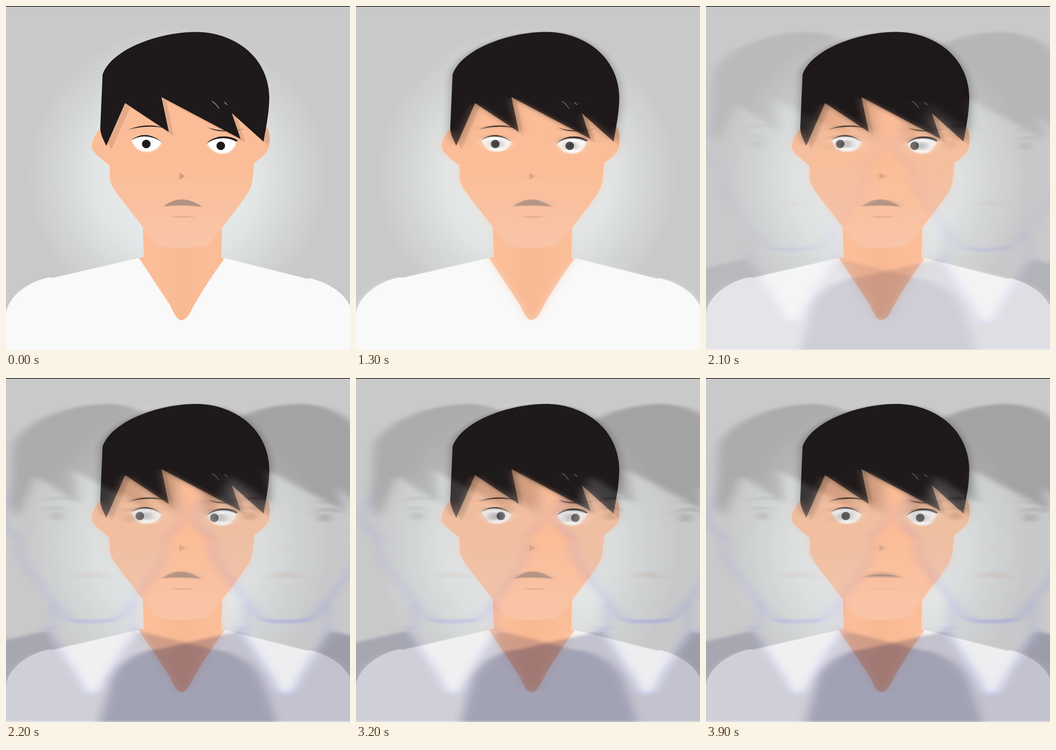
An HTML page for the animation above (4000 ms loop, 748x748 px).

```html
<!DOCTYPE html>
<html lang="en">
<head>
<meta charset="utf-8">
<title>Anxious portrait</title>
<style>
  html, body { margin: 0; width: 100%; height: 100%; overflow: hidden; }
  svg { display: block; width: 748px; height: 748px; }
  .shirt { fill: var(--shirt, #f9f9f9); }
  .neck { fill: var(--skin, url(#neckTone)); }
  .face { fill: var(--skin, url(#faceTone)); }
  .neck, .face { stroke: var(--rim, none); stroke-width: 14; paint-order: stroke; }
  .hair { fill: #1e191a; }
  .white { fill: var(--white, #fff); }
  .line { fill: none; stroke: #1e191a; }
  .eyes { transform-origin: 0 288px; transform: scaleY(var(--open, 1)); }
  .pupils { fill: #1e191a; opacity: var(--pupil, 1); transform: translateX(var(--look, 0px)); }
  .mouth { transform-origin: 0 430px; transform: translateX(var(--mouthX, 0px)) scaleY(var(--mouthY, 1)); }
  #ghosts { --shirt: #000037; --skin: #c4c8cc; --white: #c4c8cc; --rim: #4a4aff; }
</style>
</head>
<body>
<svg viewBox="0 0 748 748">
  <defs>
    <radialGradient id="glow" gradientUnits="userSpaceOnUse" cx="372" cy="370" r="328">
      <stop offset="0" stop-color="#eef2f2"/>
      <stop offset=".55" stop-color="#e2e5e5"/>
      <stop offset=".8" stop-color="#d3d5d5"/>
      <stop offset="1" stop-color="#c9c9ca"/>
    </radialGradient>
    <linearGradient id="faceTone" x2="0" y2="1">
      <stop offset=".5" stop-color="#fbbd97"/>
      <stop offset="1" stop-color="#f9c5a8"/>
    </linearGradient>
    <linearGradient id="neckTone">
      <stop offset=".2" stop-color="#fbbe99"/>
      <stop offset=".5" stop-color="#f8b993"/>
      <stop offset=".8" stop-color="#fbbd97"/>
    </linearGradient>
    <filter id="soft" x="-20%" y="-20%" width="140%" height="140%">
      <feGaussianBlur stdDeviation="1.8"/>
    </filter>
    <filter id="shake" filterUnits="userSpaceOnUse" x="-80" y="-20" width="920" height="800" color-interpolation-filters="sRGB">
      <feGaussianBlur stdDeviation="11 1"/>
    </filter>
    <filter id="smear" filterUnits="userSpaceOnUse" x="-80" y="-20" width="920" height="800" color-interpolation-filters="sRGB">
      <feGaussianBlur stdDeviation="11 2"/>
    </filter>
    <path id="facePath" d="M205 266C190 285 186 295 187 310C191 320 208 333 225 347L226 379C231 396 240 405 251 421L297 480C308 495 320 512 334 521C352 529 395 526 430 523C444 516 455 500 470 482L510 430C525 408 534 397 536 378L540 341C561 326 571 317 573 300C575 283 572 270 566 262L540 150H230Z"/>
    <path id="hairPath" d="M210 149C228 95 330 57 412 56.5C495 56 572 110 572.5 200C572 235 565 265 560 295L491 233L510 289L338 198L354 274L259 211L218 304C210 287 205 278 205 264Z"/>
    <clipPath id="onFace"><use href="#facePath"/></clipPath>

    <g id="person">
      <path class="shirt" d="M-22 748C-12 712 -6 690 0 668C5 630 50 598 95 590L102 591L289 548H475L655 593L662 592C705 603 735 625 748 652C762 685 772 715 782 748Z"/>
      <path class="neck" d="M297 470L300 546L289 548L357 651C369 678 375 683 382 683C391 682 398 673 406 656C420 630 455 575 475 550L468 547L470 470Z"/>
      <use class="face" href="#facePath"/>
      <g clip-path="url(#onFace)"><use href="#hairPath" x="11" y="9" opacity=".1"/></g>

      <g class="eyes">
        <g class="white" filter="url(#soft)">
          <path d="M273 291Q303 271 338 295C334 311 320 317 305 317C288 317 277 305 273 291Z"/>
          <path d="M437 299C450 285 480 282 502 293C497 313 484 321 470 321C454 321 443 311 437 299Z"/>
        </g>
        <path class="hair" d="M271 292Q303 267 340 296Q304 273 271 292Z"/>
        <path class="hair" d="M435 300C450 282 482 278 504 292L501 295C480 283 452 286 435 300Z"/>
      </g>
      <g class="pupils">
        <circle cx="305" cy="300" r="9.3"/>
        <circle cx="467" cy="304" r="9.3"/>
      </g>

      <path class="hair" d="M266 269Q305 253 344 265Q305 258 266 269Z"/>
      <path class="hair" d="M439 264Q460 272 490 271Q460 276 439 264Z"/>
      <path class="line" d="M488 272Q505 271 517 267" stroke-width=".7" opacity=".6"/>
      <path d="M377 362L390 370L377 378Z" fill="#d0a088"/>
      <g class="mouth">
        <path d="M342 436Q362 420 382 420.5Q405 421 427 437Q384 431 342 436Z" fill="#b39484"/>
        <path d="M358 457Q386 459 413 457Q386 463 358 457Z" fill="#cf9b80"/>
      </g>
      <use class="hair" href="#hairPath"/>
      <path d="M448 207Q458 214 463 223M475 209L481 215" fill="none" stroke="#c9c3bd" stroke-width="1.2"/>
    </g>
  </defs>

  <rect width="748" height="748" fill="url(#glow)"/>
  <use id="sharp" href="#person"/>
  <g id="halo" filter="url(#shake)"><use href="#person"/></g>
  <g id="ghosts">
    <g id="left" opacity=".165"><use href="#person" filter="url(#smear)"/></g>
    <g id="right" opacity=".21"><use href="#person" filter="url(#smear)"/></g>
  </g>
  <rect width="748" height="1.3"/>
</svg>
<script>
  const LOOP = 4000, STEP = 100;
  const [sharp, halo, ghosts, left, right] =
    ['sharp', 'halo', 'ghosts', 'left', 'right'].map(id => document.getElementById(id));

  // Linear interpolation through [time, value] keys
  function track(keys, t) {
    const i = keys.findIndex(k => k[0] >= t);
    if (i < 1) return keys[i < 0 ? keys.length - 1 : 0][1];
    const [t0, a] = keys[i - 1], [t1, b] = keys[i];
    return a + (b - a) * (t - t0) / (t1 - t0);
  }

  const LOOK = [[1200, 0], [1700, -11], [2000, -12.7], [2200, -14], [2400, -14],
                [2800, 2], [3200, 10], [3500, 10], [3900, -1.2], [4000, 0]];
  const OPEN = [[400, 1], [700, .35], [1000, 1]];
  const HALO = [[600, 0], [700, .38], [1800, .4], [2000, .43]];
  const GHOSTS = [[2000, 0], [2200, 1]];
  const MOUTH = [[3700, 1], [3900, .4], [4000, 1]];

  let last = -1;
  function draw(now) {
    const t = Math.floor(now % LOOP / STEP) * STEP;
    if (t !== last) {
      last = t;
      const look = track(LOOK, t), open = track(OPEN, t);
      const pose = sharp.style;
      pose.setProperty('--look', look + 'px');
      pose.setProperty('--open', open);
      pose.setProperty('--pupil', open > .5 ? 1 : 0);
      pose.setProperty('--mouthX', look / 4 + 'px');
      pose.setProperty('--mouthY', track(MOUTH, t));
      halo.style.setProperty('--open', open);
      halo.style.opacity = track(HALO, t);
      ghosts.style.opacity = track(GHOSTS, t);
      left.setAttribute('transform', `translate(${look - 181})`);
      right.setAttribute('transform', `translate(${look + 240})`);
    }
    requestAnimationFrame(draw);
  }
  draw(0);
</script>
</body>
</html>
```
